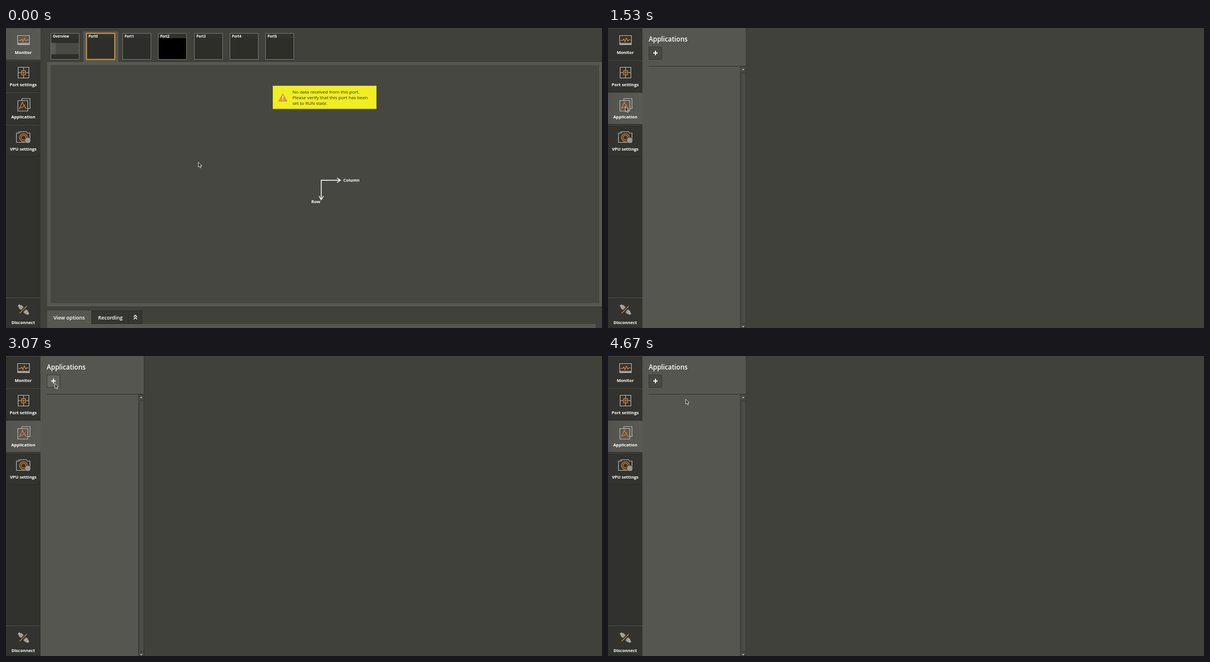
These frames come from a looping animation (1055x531 px, 8000 ms). An HTML page:

```html
<!DOCTYPE html>
<html lang="en">
<head>
<meta charset="utf-8">
<title>Port monitor</title>
<style>
html, body { margin: 0; width: 100%; height: 100%; overflow: hidden; background: #40413b; }
svg { display: block; width: 1055px; height: 531px; }
text { font: 700 7.5px "Open Sans", "Noto Sans", sans-serif; fill: #fff; }
.mid { text-anchor: middle; }
.line { fill: none; stroke: #b9bab5; stroke-width: 1.1; }
.hot { fill: none; stroke: #dd8030; stroke-width: 1.25; }
</style>
</head>
<body>
<svg viewBox="0 0 1055 531">
  <defs>
    <linearGradient id="lit"><stop stop-color="#53544e"/><stop offset="1" stop-color="#595a54"/></linearGradient>
    <filter id="shadow" x="-10%" y="-20%" width="125%" height="150%">
      <feDropShadow dx="2" dy="2" stdDeviation="1.2" flood-opacity=".35"/>
    </filter>
  </defs>
  <rect width="1055" height="531" fill="#40413b"/>

  <g id="monitor">
    <path d="M137 60V6H199V60Z" fill="#565751"/>
    <g id="tabs"></g>
    <rect x="73" y="60" width="982" height="433" fill="#575852"/>
    <rect x="79" y="65.5" width="971" height="421.5" fill="#464741"/>
    <path d="M73 493.5H1055M73 59.5H137M199 59.5H1055" stroke="#373832"/>

    <rect x="472.5" y="102.5" width="183" height="40.5" fill="#f0ee22" stroke="#c4c22c"/>
    <path d="M490 116.5L497.5 129.5H482.5Z" fill="#e79a2c" stroke="#d98a2c" stroke-linejoin="round"/>
    <path d="M490 119.5V125M490 126.5V128" stroke="#fff" stroke-width="1.6"/>
    <g id="warning"></g>

    <path d="M592 269.5H558V304M586 265.5L592 269.5L586 273.5M554 297.5L558 304L562 297.5"
      fill="none" stroke="#fff" stroke-width="1.4"/>
    <text x="597" y="272.3">Column</text>
    <text x="540.5" y="309.6">Row</text>

    <rect x="73" y="500" width="78" height="25" fill="#565751"/>
    <path d="M151.5 500.5H217.5V524H151.5ZM217.5 500.5H240.5V524H217.5Z" fill="#353630" stroke="#2d2e29"/>
    <rect x="73" y="524" width="971" height="7" fill="#565751"/>
    <text x="84" y="515.5" style="font-size:9px;font-weight:600">View options</text>
    <text x="163" y="515.5" style="font-size:9px;font-weight:600">Recording</text>
    <path d="M226 511.5L229 508.5L232 511.5M226 515.5L229 512.5L232 515.5" fill="none" stroke="#fff" stroke-width="1.4"/>
  </g>

  <g id="apps">
    <rect x="61" width="183" height="531" fill="#555650"/>
    <path d="M244.5 0V531M72 67.5H244" stroke="#363732"/>
    <text x="72" y="24" style="font-size:11.6px;font-weight:600">Applications</text>
    <rect id="plus" x="72.5" y="33.5" width="23" height="22" stroke="#383934"/>
    <path d="M80 44.3H88M84 40.3V48.3" stroke="#f2f2ee" stroke-width="2"/>
    <rect x="234.5" y="68.5" width="10" height="462" fill="#484943" stroke="#383934"/>
    <rect x="235.5" y="78.5" width="8.5" height="445" rx="3" fill="#4b4c46" stroke="#3a3b36"/>
    <path d="M237.3 74.2L239.3 72L241.3 74.2ZM237.3 527.8L239.3 530L241.3 527.8Z" fill="#d6d7d2"/>
    <g id="popup">
      <rect x="72.5" y="55.5" width="133" height="35" fill="#555650" stroke="#363732" filter="url(#shadow)"/>
      <rect id="row" x="73" y="62" width="132" height="22" fill="#686963"/>
      <text class="mid" x="139" y="76.5" style="font-size:8px">qov [UNLICENSED] (0.0.0)</text>
    </g>
  </g>

  <rect width="61" height="531" fill="#31322d"/>
  <g id="menu"></g>

  <g>
    <path class="line" d="M20.5 13.5H41.5V27H20.5Z"/>
    <path d="M20 27.5H42V30H20Z" fill="#b0b1ac"/>
    <path class="hot" d="M22 22H26L28 19.5L30 24L32.5 17.5L35 23L36.5 21H40"/>

    <path class="line" d="M21.5 69.5H40.5V88.5H21.5ZM31 69.5V75M31 83V88.5M21.5 79H27M35 79H40.5"/>
    <path class="hot" d="M27.5 75.5H34.5V82.5H27.5ZM31 77V81M29 79H33"/>

    <path class="line" d="M28 128V125H42.5V142.5H38.5M21 128.5H38.5V147H21Z"/>
    <path class="hot" d="M23.5 144L29 131L32 138L36.5 143.5M25 141.5Q30 141 34 135.5"/>

    <path class="line" d="M18.5 186H23.5L25.5 183.5H36L38 186H42.5V202.5H18.5ZM21 184H24"/>
    <circle class="hot" cx="31" cy="194" r="7"/>
    <circle class="hot" cx="31" cy="194" r="4.2"/>
    <circle cx="38.5" cy="198.8" r="5.2" fill="#b9bab5" stroke="#30312c"/>
    <circle cx="38.5" cy="198.8" r="3" fill="none" stroke="#555650" stroke-width="1.5" stroke-dasharray="1.2 1.2"/>
    <circle cx="38.5" cy="198.8" r="1" fill="#555650"/>
  </g>
  <g id="plug"></g>

  <path id="cursor" d="M.5 .5V9.2L2.5 7.4L4.1 10.7L5.5 10L4 6.9H6.7Z" fill="#2b2c28" stroke="#f4f4f0" stroke-width=".8"/>
</svg>
<script>
const $ = id => document.getElementById(id);
const show = (id, on) => $(id).style.display = on ? '' : 'none';

$('tabs').innerHTML = ['Overview', 'Port0', 'Port1', 'Port2', 'Port3', 'Port4', 'Port5'].map((name, i) => {
  const x = Math.round(79 + 63.4 * i);
  const extra = i === 0
    ? `<path d="M${x + 1} 26.5h50v20h-50z" fill="#494a45"/><path d="M${x + 1} 26.5h8v20h-8z" fill="#595a54"/>`
    : i === 3 ? `<path d="M${x + 1} 18h50v37.5h-50z" fill="#000"/>` : '';
  const border = i === 1 ? 'stroke="#e5a33a" stroke-width="1.6"' : 'stroke="#73746e"';
  return `<rect x="${x + .5}" y="9.5" width="50" height="46" fill="#2d2e29"/>
    <path d="M${x + 1} 10h50v8h-50z" fill="#31322d"/>${extra}
    <rect x="${x + .5}" y="9.5" width="50" height="46" fill="none" ${border}/>
    <text x="${x + 4}" y="16.8" style="font-size:6.1px">${name}</text>`;
}).join('');

$('warning').innerHTML = [
  'No data received from this port.',
  'Please verify that this port has been',
  'set to RUN state.'
].map((line, i) => `<text x="507" y="${116 + 9.8 * i}" style="font-size:8px;font-weight:400;fill:#2c2d22">${line}</text>`).join('');

const labels = ['Monitor', 'Port settings', 'Application', 'VPU settings', 'Disconnect'];
$('menu').innerHTML = labels.map((name, i) => {
  const y = i < 4 ? 57 * i : 477;
  return `<rect id="item${i}" y="${y}" width="61" height="57"/>
    <path d="M0 ${y + .5}H61" stroke="#494a45"/><path d="M0 ${y + 56.5}H61" stroke="#2a2b27"/>
    <text class="mid" x="30.5" y="${y + (i < 4 ? 46 : 46.5)}">${name}</text>`;
}).join('');

const plugHalf = '<path d="M-12 -2H-9V-3.5H-3V3.5H-9V2H-12Z" fill="#b0b1ac"/><path d="M-7.5 -3.5V3.5M-5 -3.5V3.5" stroke="#777872" stroke-width=".8"/>';
$('plug').innerHTML = `<g transform="translate(31 498.5) rotate(42)">${plugHalf}<g transform="scale(-1 1)">${plugHalf}</g></g>
  <path d="M24 505L37 492" stroke="#31322d" stroke-width="4"/><path class="hot" d="M24 505L37 492"/>`;

// Pointer moves: start time, end time, target x, target y
const moves = [
  [467, 933, 55, 160], [1000, 1333, 30, 139], [2067, 2466, 83, 52], [2733, 2800, 86, 48],
  [3533, 3733, 87, 49], [3733, 3933, 133, 72], [4000, 4066, 137, 76]
];

function pointerAt(t) {
  let x = 340, y = 237;
  for (const [from, to, tx, ty] of moves) {
    const p = Math.min(1, Math.max(0, (t - from) / (to - from)));
    const e = p * p * (3 - 2 * p);
    x += (tx - x) * e;
    y += (ty - y) * e;
  }
  return [x, y];
}

function draw(now) {
  // The screen updates 15 times a second
  const tick = 1000 / 15, t = Math.floor((now % 8000 + 5) / tick) * tick + .1;
  const [x, y] = pointerAt(t);
  const appsOpen = t >= 1533, popupOpen = t >= 3400 && t < 4666;

  show('monitor', !appsOpen);
  show('apps', appsOpen);
  show('popup', popupOpen);
  show('row', y >= 62);

  const active = appsOpen ? 2 : 0;
  labels.forEach((_, i) => {
    const hover = i === 2 && x < 61;
    $('item' + i).setAttribute('fill', i === active ? 'url(#lit)' : hover ? '#40413b' : '#32332e');
  });

  const overPlus = x >= 72 && x < 96 && y < 56 && t < 3600;
  const pressed = t >= 3000 && t < 3066;
  $('plus').setAttribute('fill', pressed ? '#3c3d37' : overPlus ? '#64655f' : '#474842');
  $('cursor').setAttribute('transform', `translate(${Math.round(x)} ${Math.round(y)})`);
}

(function loop() {
  draw(performance.now());
  requestAnimationFrame(loop);
})();
</script>
</body>
</html>
```
